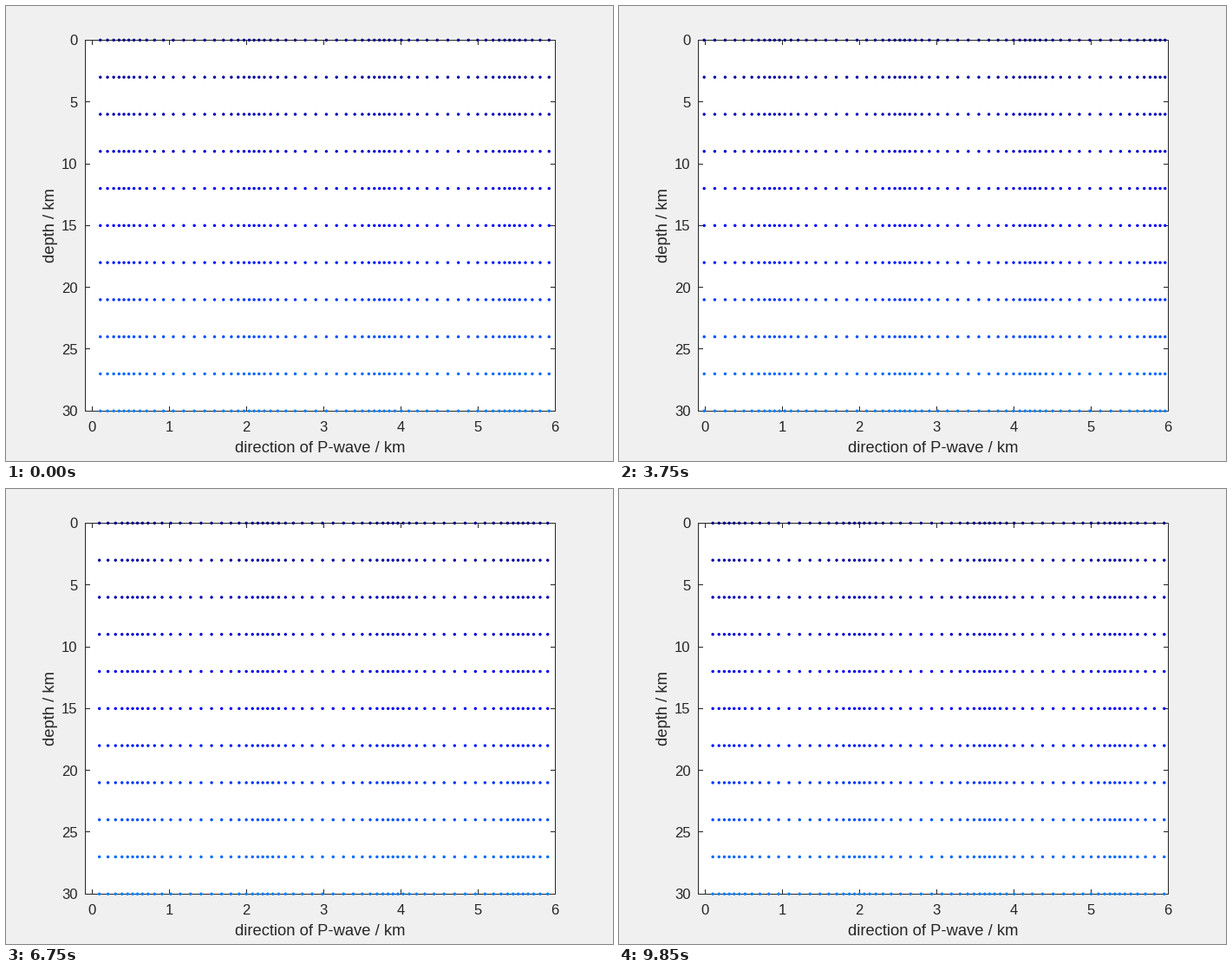
A matplotlib script that plays this animation: 700 px wide and 525 px high, repeating every 9.95 s.

```python
import numpy as np
import matplotlib.pyplot as plt
from matplotlib.animation import FuncAnimation
from matplotlib.patches import Rectangle

plt.rcParams["font.family"] = "Liberation Sans"

W, H, DPI = 700, 525, 100
PT = 72 / DPI                      # points per pixel
LEFT, RIGHT, TOP, BOTTOM = 91.0, 633.5, 39.375, 467.25
X_MIN, X_MAX, DEPTH = -0.1, 6.0, 30.0
AMP, WAVELENGTH, STEP = 0.1, 5 / 3, 0.1
INK, ICON = "#262626", "#8a8a8a"
TOOLBAR = range(16, 29)            # steps with the toolbar in view

fig = plt.figure(figsize=(W / DPI, H / DPI), dpi=DPI, facecolor="#f0f0f0")
ax = fig.add_axes([0, 0, 1, 1])
ax.set_xlim(0, W)
ax.set_ylim(H, 0)
ax.axis("off")


def px(x):
    return LEFT + (x - X_MIN) / (X_MAX - X_MIN) * (RIGHT - LEFT)


def py(d):
    return TOP + d / DEPTH * (BOTTOM - TOP)


def mid(v):
    """Centre of the pixel that holds v."""
    return np.floor(v) + 0.5


def line(xs, ys, color=INK, width=1.0, **kw):
    return ax.plot(xs, ys, color=color, lw=width * PT, snap=False,
                   solid_capstyle="butt", solid_joinstyle="miter", **kw)[0]


def label(x, y, s, size, **kw):
    ax.text(x, y, s, fontsize=size * PT, color=INK, va="baseline",
            rotation_mode="anchor", **kw)


# Axes box, ticks and labels
x0, x1, y0, y1 = map(mid, (LEFT, RIGHT, TOP, BOTTOM))
ax.add_patch(Rectangle((x0, y0), x1 - x0, y1 - y0, fc="white", lw=0))
line([x0, x1, x1, x0, x0], [y0, y0, y1, y1, y0])
for v in range(7):
    x = mid(px(v))
    line([x, x], [y1, y1 - 5.5])
    line([x, x], [y0, y0 + 5.5])
    label(px(v) - 0.7, 491, str(v), 16.67, ha="center")
for v in range(0, 31, 5):
    y = mid(py(v))
    line([x0, x0 + 5.5], [y, y])
    line([x1, x1 - 5.5], [y, y])
    label(82.7, round(py(v)) + 6, str(v), 16.67, ha="right")
label(362.3, 515, "direction of P-wave / km", 18.33, ha="center")
label(55.7, 253.3, "depth / km", 18.33, ha="center", rotation=90)

# Particles: eleven layers, coloured from dark to light blue
rest = np.arange(61) * 0.1
layers = np.arange(11)
shade = 0.52 + 0.098 * layers
rgb = np.column_stack([0 * shade, np.clip(shade - 1, 0, 1), np.clip(shade, 0, 1)])
row_y = np.repeat(py(layers * 3.0), rest.size)
dots = ax.scatter(np.zeros(row_y.size), row_y, s=(3.44 * PT) ** 2,
                  c=np.repeat(rgb, rest.size, axis=0), linewidths=0, zorder=5)

# Toolbar icons, built from strokes, boxes and markers
icons = []


def stroke(*pts, width=1.5):
    icons.append(line(*zip(*pts), ICON, width, zorder=6))


def box(x, y, w, h, fill="none"):
    icons.append(ax.add_patch(Rectangle((x, y), w, h, fc=fill, ec=ICON,
                                        lw=1.5 * PT, zorder=6)))


def mark(x, y, shape, size, fill="none"):
    icons.append(ax.plot(x, y, shape, ms=size * PT, mfc=fill, mec=ICON,
                         mew=1.5 * PT, zorder=6)[0])


def arc(cx, cy, r, a, b):
    t = np.radians(np.linspace(a, b, 30))
    stroke(*zip(cx + r * np.cos(t), cy + r * np.sin(t)))


def export(x, y):
    stroke((x - 9, y + 8), (x + 6, y + 8), width=2)
    arc(x + 3, y + 4, 8, 180, 270)
    mark(x + 5, y - 4, ">", 5, ICON)
    mark(x + 8, y + 7, "^", 2, ICON)


def brush(x, y):
    box(x + 2.5, y - 9.5, 3, 9)
    box(x - 1, y, 8, 3, ICON)
    for k in range(4):
        stroke((x - 1 + 2.8 * k, y + 3), (x - 7 + 4.5 * k, y + 9.5))
    stroke((x - 8, y + 9.5), (x + 7, y + 9.5))


def data_tip(x, y):
    box(x - 7, y - 8.5, 15, 17.5)
    mark(x - 8, y, "<", 3, ICON)
    for k in (-1, 0, 1):
        stroke((x - 3, y + 4 * k), (x + 5, y + 4 * k))


def hand(x, y):
    arc(x + 1, y + 2, 7, 0, 180)
    stroke((x - 4, y + 6), (x - 8.5, y + 1))
    for k in range(5):
        top = y - 5 - 3.5 * np.sin(np.pi * k / 4)
        stroke((x - 6 + 3.5 * k, y + 3), (x - 6 + 3.5 * k, top))


def zoom(x, y, sign):
    mark(x - 2, y - 2, "o", 14)
    mark(x - 2, y - 2, sign, 7)
    stroke((x + 3, y + 3), (x + 9, y + 9), width=2.2)


def home(x, y):
    stroke((x - 9.5, y + 1), (x, y - 8.5), (x + 9.5, y + 1))
    for side in (-1, 1):
        stroke((x + 6.5 * side, y - 1), (x + 6.5 * side, y + 9),
               (x + 2.5 * side, y + 9), (x + 2.5 * side, y + 3), (x, y + 3))


export(471, 25)
brush(498, 25)
data_tip(522, 25)
hand(546, 25)
zoom(571.5, 25, "+")
zoom(596.5, 25, "_")
home(621.5, 25)


def draw(tick):
    step = (tick + 1) // 2         # first picture lasts half as long
    phase = 2 * np.pi * (rest - STEP * step) / WAVELENGTH
    x = rest + AMP * np.cos(phase)
    x = np.where(x <= X_MAX + 1e-9, px(x), np.nan)
    dots.set_offsets(np.column_stack([np.tile(x, layers.size), row_y]))
    for icon in icons:
        icon.set_visible(step in TOOLBAR)
    return [dots, *icons]


anim = FuncAnimation(fig, draw, frames=199, interval=50, repeat=True,
                     repeat_delay=0, init_func=lambda: draw(0))
plt.show()
```
